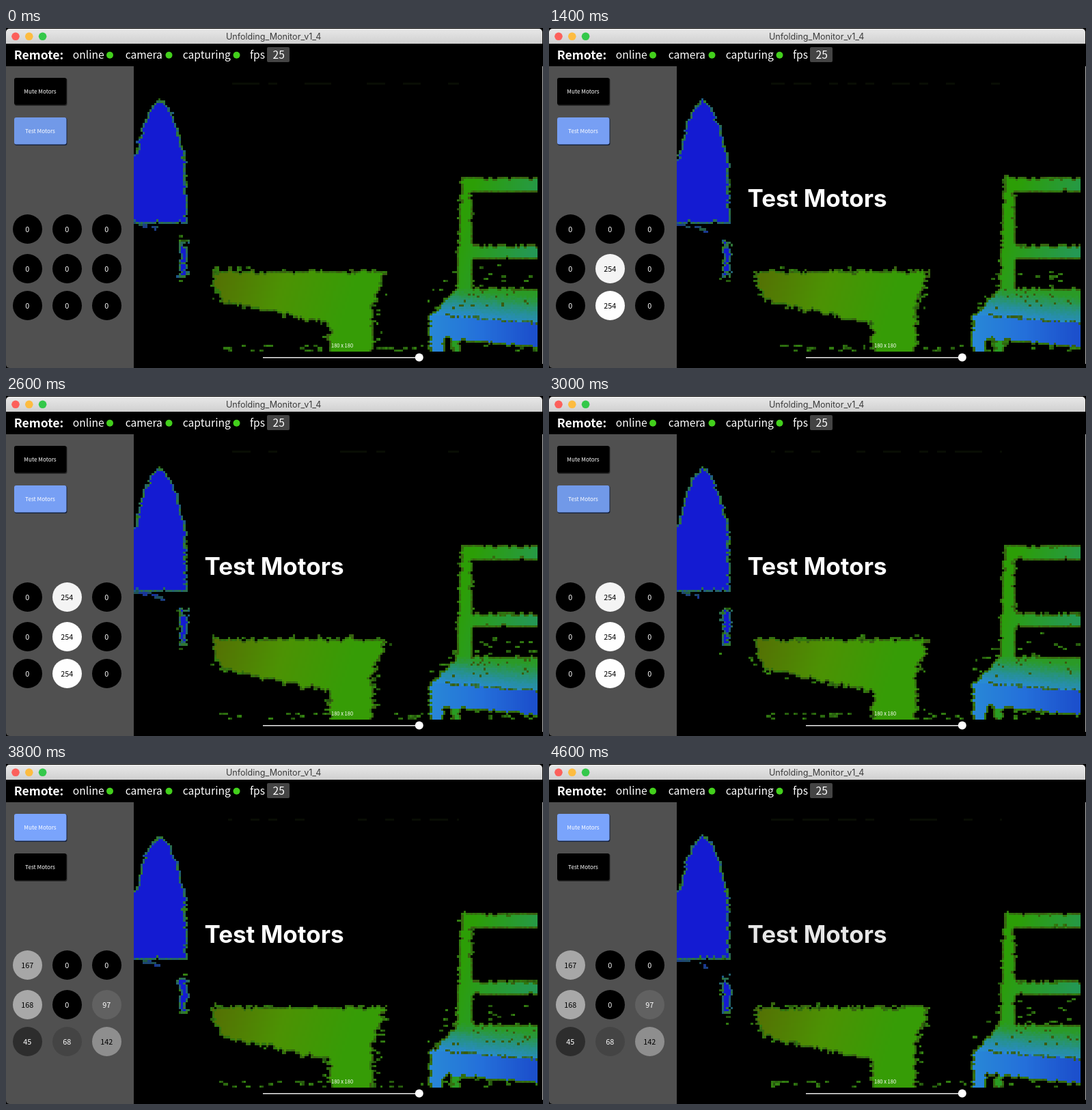
Recreate the animation shown at these times as an HTML page with a canvas. Size 786x498 px, loop 4700 ms.

```html
<!DOCTYPE html>
<html lang="en">
<head>
<meta charset="utf-8">
<title>Monitor</title>
<style>
  html, body { margin: 0; width: 100%; height: 100%; overflow: hidden; background: #000; }
  canvas { display: block; }
</style>
</head>
<body>
<canvas id="stage" width="786" height="498"></canvas>
<script>
const ctx = document.getElementById('stage').getContext('2d');
const SANS = '"Noto Sans CJK JP", "Noto Sans CJK SC", "Noto Sans", sans-serif';
const STEP = 100, STEPS = 47;
const TIMES = { low: 600, mid: 1200, high: 2000, leave: 2900, mute: 3300 };

// Depth view: a coarse grid scaled up to the stage
const VIEW = { x: 187, y: 80, w: 591, h: 394 };
const COLS = 180, ROWS = 120;
const CELL = VIEW.w / COLS;
const grid = document.createElement('canvas');
grid.width = COLS;
grid.height = ROWS;
const gridCtx = grid.getContext('2d');
const pixels = gridCtx.createImageData(COLS, ROWS);
const mask = new Uint8Array(COLS * ROWS);

function hash(a, b, c) {
  let h = Math.imul(a + 11, 374761393) ^ Math.imul(b + 7, 668265263) ^ Math.imul(c + 3, 1274126177);
  h = Math.imul(h ^ (h >>> 13), 1103515245);
  h = Math.imul(h ^ (h >>> 15), 2246822519);
  return ((h ^ (h >>> 16)) >>> 0) / 4294967296;
}

const clamp = (v) => Math.max(0, Math.min(1, v));
const mix = (a, b, t) => a.map((v, k) => v + (b[k] - v) * clamp(t));
const ramp = (a, b, c, t) => (t < 0.5 ? mix(a, b, t * 2) : mix(b, c, t * 2 - 1));
const box = (x0, y0, x1, y1) => (x, y) => x > x0 && x < x1 && y > y0 && y < y1;

const OLIVE = [58, 92, 16], GREEN = [44, 158, 6], TEAL = [38, 145, 140], BLUE = [20, 27, 210];
const oliveEdge = (n) => mix(OLIVE, [48, 125, 14], n);
const blueEdge = (n) => mix([50, 122, 44], [28, 88, 140], n);
const blue = () => BLUE;
const rail = (x, y) => mix(GREEN, [36, 152, 84], (x - 685 + (y - 230) * 0.3) / 115);

// Pointed back of the far chair
function leaf(x, y) {
  const u = (y - 104) / 182;
  if (u < 0 || u > 1) return false;
  return Math.abs(x - 225) < 39.5 * Math.sin(Math.PI / 2 * Math.min(1, u * 1.5)) ** 0.65;
}

function bench(x, y) {
  if (y < 355 || x > Math.max(538, 556 - (y - 355) * 0.32)) return false;
  const slab = x > 302 + Math.max(0, y - 372) * 0.45 && y < 401 + (x - 316) * 0.21;
  return slab || x > 473;
}

function benchColor(x, y) {
  return ramp([84, 112, 4], [76, 146, 4], [54, 156, 6], (x - 305 + (y - 360) * 0.3) / 210);
}

function post(x, y) {
  return y > 217 && y < 392 && x < 682 && x > 666 - (y - 217) * 0.045;
}

function seat(x, y) {
  if (x < Math.max(619, 619 + (424 - y) * 0.95) || y < 381) return false;
  return x < 641 || y < 455 + (x - 641) * 0.11;
}

function seatColor(x, y, n) {
  const crease = 421 + (x - 640) * 0.08;
  if (x > 643 && Math.abs(y - crease) < 2 && n < 0.6) return mix(OLIVE, TEAL, n);
  if (y > crease) return ramp([40, 136, 214], [36, 112, 218], [28, 80, 204], (x - 620) / 150);
  if (y < 412 && n < 0.06) return OLIVE;
  const t = (y - 384 + (n - 0.5) * 5 + (660 - x) * 0.08) / (crease - 384);
  return ramp([42, 154, 38], TEAL, [40, 138, 212], t);
}

// rough: edge jitter; spray: reach of loose specks around the shape
const shapes = [
  { test: leaf, color: blue, edge: blueEdge, rough: 3.5, spray: [0, 0] },
  { test: box(253, 311, 265, 366), color: blue, edge: blueEdge, rough: 5, spray: [6, 30] },
  { test: bench, color: benchColor, edge: oliveEdge, rough: 6, spray: [30, 10] },
  { test: post, color: rail, edge: oliveEdge, rough: 2.5, spray: [10, 0] },
  { test: box(666, 219, 800, 240), color: rail, edge: oliveEdge, rough: 2, spray: [0, 0] },
  { test: box(678, 318, 800, 339), color: rail, edge: oliveEdge, rough: 2.5, spray: [0, 0] },
  { test: seat, color: seatColor, edge: oliveEdge, rough: 2.5, spray: [4, 82] },
  { test: box(651, 457, 666, 480), color: rail, edge: oliveEdge, rough: 3, spray: [0, 0] }
];

const floor = box(312, 464, 612, 474);
const topLine = box(325, 80, 662, 83);

// Steady, coarse and fine jitter added together
function wobble(i, j, f, k) {
  return (hash(i >> 1, j >> 1, k) - 0.5) * 0.8 +
         (hash(i >> 1, j, f * 5 + k + 40) - 0.5) * 0.7 +
         (hash(i, j, f * 5 + k + 42) - 0.5) * 0.5;
}

function speck(i, j, x, y, f) {
  const n = hash(i >> 1, j, f + 500);
  if (x < 232 && Math.abs(y - 288 - (x - 190) ** 2 * 0.006) < 3 && n < 0.65) return mix([34, 95, 60], BLUE, n);
  if (topLine(x, y) && hash(i >> 2, 0, f) < 0.4) return [9, 13, 4];
  const dx = hash(i >> 1, j, f + 700) - 0.5, dy = hash(i >> 1, j, f + 900) - 0.5;
  const near = shapes.some((s) => s.test(x + dx * s.spray[0], y + dy * s.spray[1]));
  const lit = near ? n < 0.3 : floor(x, y) && n < 0.2;
  return lit ? mix([34, 80, 12], [54, 135, 18], hash(i, j, f)) : [0, 0, 0];
}

function cells(visit) {
  for (let j = 0; j < ROWS; j++) {
    for (let i = 0; i < COLS; i++) {
      visit(i, j, j * COLS + i, VIEW.x + (i + 0.5) * CELL, VIEW.y + (j + 0.5) * CELL);
    }
  }
}

function onEdge(i, j, k) {
  return (i > 0 && !mask[k - 1]) || (i < COLS - 1 && !mask[k + 1]) ||
         (j > 0 && !mask[k - COLS]) || (j < ROWS - 1 && !mask[k + COLS]);
}

function drawDepth(f) {
  cells((i, j, k, x, y) => {
    const dx = wobble(i, j, f, 0), dy = wobble(i, j, f, 1);
    mask[k] = 1 + shapes.findLastIndex((s) => s.test(x + dx * s.rough, y + dy * s.rough));
  });
  cells((i, j, k, x, y) => {
    const n = hash(i, j, hash(i, j, 9) < 0.5 ? 10 : f + 300);
    const s = shapes[mask[k] - 1];
    const c = !s ? speck(i, j, x, y, f) : onEdge(i, j, k) ? s.edge(n) : s.color(x, y, n);
    pixels.data.set([...c, 255], k * 4);
  });
  gridCtx.putImageData(pixels, 0, 0);
  ctx.imageSmoothingEnabled = false;
  ctx.filter = 'blur(0.7px)';
  ctx.drawImage(grid, VIEW.x, VIEW.y, VIEW.w, VIEW.h);
  ctx.filter = 'none';
}

function rect(x, y, w, h, fill, r = 0) {
  ctx.fillStyle = fill;
  ctx.beginPath();
  ctx.roundRect(x, y, w, h, r);
  ctx.fill();
}

function dot(x, y, r, fill) {
  ctx.fillStyle = fill;
  ctx.beginPath();
  ctx.arc(x, y, r, 0, Math.PI * 2);
  ctx.fill();
}

function text(str, x, y, font, fill = '#fff', align = 'left') {
  ctx.font = font;
  ctx.fillStyle = fill;
  ctx.textAlign = align;
  ctx.fillText(str, x, y);
}

function drawHeader() {
  const bar = ctx.createLinearGradient(0, 1, 0, 23);
  bar.addColorStop(0, '#e8e8e8');
  bar.addColorStop(1, '#d0d0d0');
  rect(0, 1, 785, 22, bar, [5, 5, 0, 0]);
  ['#fc605b', '#fdbc40', '#34c84a'].forEach((c, i) => dot(14 + i * 19.8, 12.3, 5.8, c));
  text('Unfolding_Monitor_v1_4', 391.7, 17, '12.6px Inter, sans-serif', '#3c3c3c', 'center');

  text('Remote:', 11.8, 46.3, `bold 17.6px ${SANS}`);
  const label = `15.6px ${SANS}`;
  [['online', 97.8, 152], ['camera', 174.8, 238.5], ['capturing', 258.8, 337.5]].forEach(([s, x, d]) => {
    text(s, x, 44.5, label);
    dot(d, 39.8, 5, '#43d01c');
  });
  text('fps', 357, 44.5, label);
  rect(382, 28, 33, 22, '#444', 2);
  text('25', 399.2, 45.3, label, '#fff', 'center');
}

function button(label, y, on, fill) {
  rect(12.5, y + 0.5, 77, 40.5, on ? '#17223c' : '#2a2a2a', 3);
  rect(12, y, 76.5, 39.5, on ? fill : '#000', 3);
  text(label, 50, y + 23.3, `8.2px ${SANS}`, '#fff', 'center');
}

function motors(t) {
  if (t >= TIMES.mute) return [167, 0, 0, 168, 0, 97, 45, 68, 142];
  const v = new Array(9).fill(0);
  [TIMES.high, TIMES.mid, TIMES.low].forEach((at, row) => {
    if (t >= at) v[row * 3 + 1] = 254;
  });
  return v;
}

function drawPanel(t) {
  rect(0, 56, 187, 442, '#505050', [0, 0, 0, 5]);
  const muted = t >= TIMES.mute;
  const hover = t < 200 || t >= TIMES.leave;
  button('Mute Motors', 73, muted, '#7aa4fc');
  button('Test Motors', 131, !muted, hover ? '#7199e8' : '#779ff4');

  const values = motors(t);
  const latest = values.indexOf(254);
  values.forEach((v, i) => {
    const x = 31.5 + (i % 3) * 58, y = [294.5, 352.5, 406.5][Math.floor(i / 3)];
    const g = i === latest ? 244 : v;
    dot(x, y, 21.5, `rgb(${g},${g},${g})`);
    text(String(v), x - 0.3, y + 4.7, `10.8px ${SANS}`, v > 120 ? '#000' : '#fff', 'center');
  });
}

function drawOverlay(t) {
  ctx.globalAlpha = clamp((t - 200) / 400) * (1 - clamp((t - 4500) / 1000));
  text('Test Motors', 290.5, 261.5, 'bold 35px Inter, sans-serif');
  ctx.globalAlpha = 1;
  text('180 x 180', 476, 468, `7.5px ${SANS}`);
  rect(376, 482, 229, 1.5, '#e8e8e8');
  dot(604.8, 482.5, 6, '#fff');
  rect(785, 56, 1, 436, '#b8b8b8');
}

function draw(step) {
  const t = step * STEP;
  rect(0, 0, 786, 498, '#000');
  drawDepth(step);
  drawHeader();
  drawPanel(t);
  drawOverlay(t);
}

let shown = -1;
const start = performance.now();
function tick() {
  const step = Math.floor(Math.max(0, performance.now() - start) / STEP) % STEPS;
  if (step !== shown) draw(shown = step);
  requestAnimationFrame(tick);
}
tick();
</script>
</body>
</html>
```
